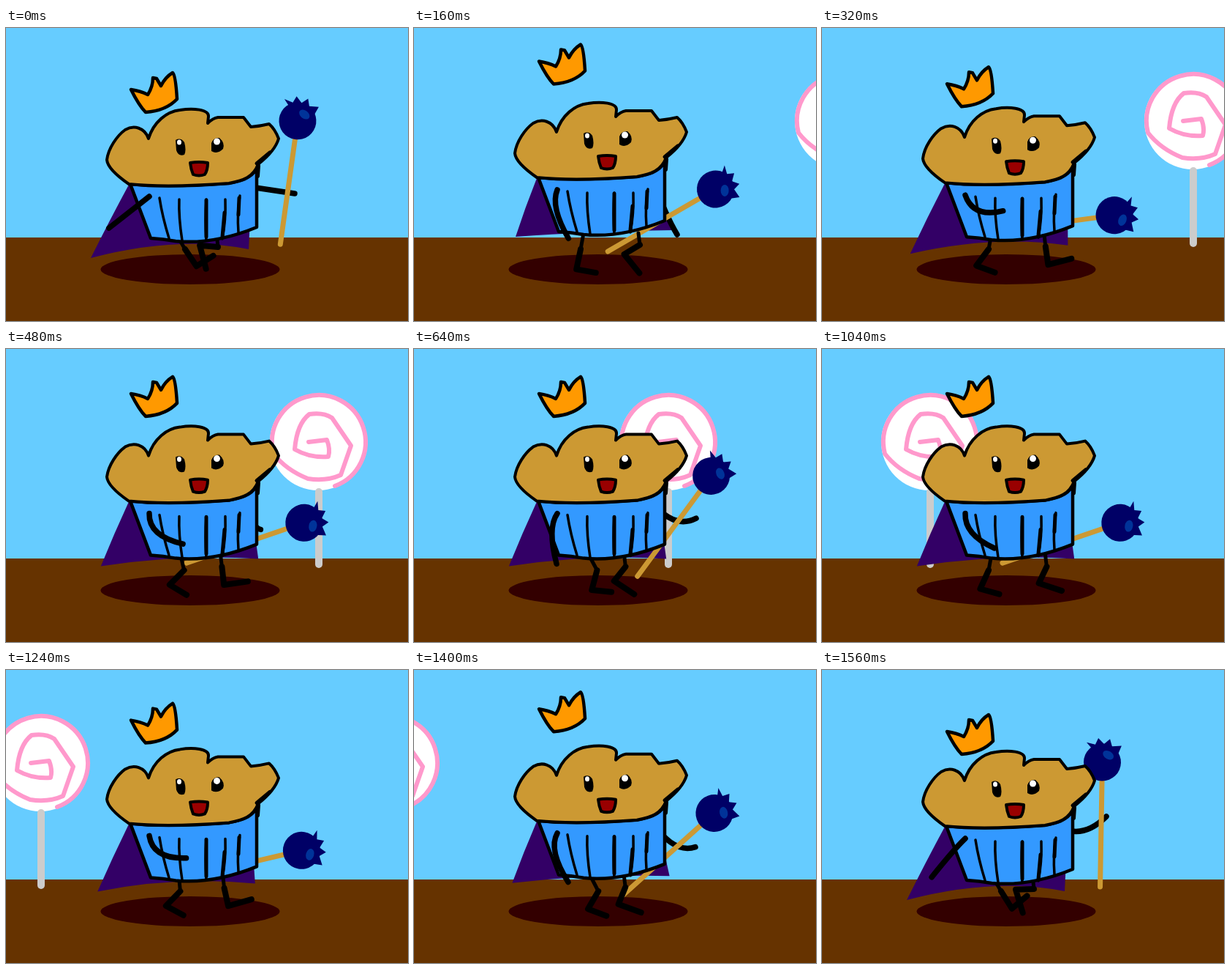
An HTML page with a canvas that plays this animation: 550 by 400 pixels, repeating every 1600 ms.

```html
<!DOCTYPE html>
<html lang="en">
<head>
<meta charset="utf-8">
<title>Marching muffin</title>
<style>
  html, body { margin: 0; width: 100%; height: 100%; overflow: hidden; }
  canvas { display: block; }
</style>
</head>
<body>
<canvas id="stage" width="550" height="400"></canvas>
<script>
const ctx = document.getElementById('stage').getContext('2d');
ctx.lineCap = ctx.lineJoin = 'round';

const STEP_MS = 40, STEPS = 40, STRIDE = 20;

const MUFFIN = new Path2D(`M168 213C155 204 139 191 138 180C140 164 152 147 163 139
  C175 132 190 136 195 151C202 128 220 114 238 112C256 109 278 111 277 121L276 130
  Q283 123 290 122H325L335 135Q348 134 360 131Q368 138 373 151Q368 168 345 186
  C338 204 325 208 305 212C265 215 215 218 168 213Z`);
const PAPER = new Path2D(`M170 213L198 287Q215 288 232 291Q284 296 343 272V192
  C335 206 320 209 305 212C265 215 215 218 170 213Z`);
const PLEATS = new Path2D('M210 232Q214 258 223 287M237 234Q236 258 241 290' +
  'M274 234Q272 262 274 290M300 234Q301 262 296 288M320 229Q316 252 318 279');
const BOLD_PLEATS = new Path2D('M274 235V285M299 252L296 285M319 232L318 255');
const EYES = new Path2D('M232 153Q239 149 244 156Q247 167 244 173Q236 176 233 167Z' +
  'M281 157Q284 149 292 150Q300 157 297 165Q289 173 281 168Z');
const MOUTH = new Path2D('M252 184Q264 182 276 184Q276 194 272 200Q264 203 256 200Q253 193 252 184Z');
const CROWN = new Path2D('M171 84Q184 86 194 91Q201 80 201 68L206 69L212 79Q218 67 228 61' +
  'Q232 64 234 97Q219 113 191 115Q182 106 171 84Z');
const LEAVES = new Path2D('M-22 -10L-15 -19L-22 -27L-10 -24L-6 -33L2 -25L10 -32L13 -22L26 -23L20 -8Z');
const SWIRL = new Path2D('M-14 0L11 -3Q16 10 13 20Q-12 22 -33 10Q-30 -25 -13 -38Q6 -41 18 -33' +
  'L44 5L30 45Q10 54 -15 50Q-45 38 -62 16A64 64 0 1 1 22 60');

const rad = degrees => degrees * Math.PI / 180;

// Point at a distance from another; angle 0 hangs down, 90 points right.
const reach = ([x, y], angle, length) =>
  [x + length * Math.sin(rad(angle)), y + length * Math.cos(rad(angle))];

// Linear swing through the five poses of a stride; the way back mirrors the way out.
function strideAt(step) {
  const leg = step < 4 ? 0 : Math.min(3, Math.floor((step + 1) / 5));
  const from = Math.max(0, leg * 5 - 1), to = leg * 5 + 4;
  const k = (step - from) / (to - from);
  return (rest, lift, far, fall = lift, settle = rest) => {
    const poses = [rest, lift, far, fall, settle];
    return poses[leg] + (poses[leg + 1] - poses[leg]) * k;
  };
}

function paint(path, fill, line, width) {
  if (fill) { ctx.fillStyle = fill; ctx.fill(path); }
  if (line) { ctx.strokeStyle = line; ctx.lineWidth = width; ctx.stroke(path); }
}

function ellipse(x, y, rx, ry, fill, tilt = 0) {
  const path = new Path2D();
  path.ellipse(x, y, rx, ry, rad(tilt), 0, 7);
  paint(path, fill);
}

function line(color, width, ...points) {
  const path = new Path2D();
  points.forEach(p => path.lineTo(...p));
  paint(path, null, color, width);
}

function curve(start, control, end) {
  const path = new Path2D();
  path.moveTo(...start);
  path.quadraticCurveTo(...control, ...end);
  paint(path, null, '#000', 7.5);
}

function shifted(x, y, drawing) {
  ctx.save();
  ctx.translate(x, y);
  drawing();
  ctx.restore();
}

function drawLollipop() {
  ellipse(-1, 0, 66, 66, '#fff');
  paint(SWIRL, null, '#ff99cc', 6);
  line('#ccc', 10, [0, 68], [0, 167]);
}

function drawCape(b) {
  const path = new Path2D();
  path.moveTo(168, 214 - 9 * b);
  path.quadraticCurveTo(142 + 10 * b, 262 - 17 * b, 116 + 23 * b, 314 - 29 * b);
  path.quadraticCurveTo(235, 283 - 5 * b, 332 + 22 * b, 302 - 26 * b);
  path.lineTo(336, 220);
  paint(path, '#330066');
}

function drawScepter(tilt) {
  ctx.rotate(rad(tilt));
  line('#cc9933', 7, [0, 84], [0, -65]);
  ctx.translate(0, -86);
  paint(LEAVES, '#000066');
  ellipse(0, 0, 25.5, 25.5, '#000066');
  ellipse(8, -10, 8, 5.5, '#003399', 30);
}

function drawLeg(hipX, knee, shinAngle, shin, footAngle, foot) {
  const ankle = reach(knee, shinAngle, shin);
  line('#000', 5, [hipX, 280], knee);
  line('#000', 8, knee, ankle, reach(ankle, footAngle, foot));
}

function drawFarArm(swing, b) {
  const shoulder = [328, 216 - 7 * b];
  const hand = [swing(395, 360, 295, 384, 389), swing(226, 282, 238, 252, 200)];
  const sag = swing(0, 10, 0, 26, 22);
  curve(shoulder, [(shoulder[0] + hand[0]) / 2, (shoulder[1] + hand[1]) / 2 + sag], hand);
}

function drawNearArm(swing, b) {
  const shoulder = [196, 230 - 9 * b];
  const elbow = reach(shoulder, swing(-52, -2, 52, 4, -43), 28);
  const hand = reach(shoulder, swing(-52, 13, 81, 26, -41), swing(70, 68, 53));
  curve(shoulder, elbow.map((e, i) => 2 * e - (shoulder[i] + hand[i]) / 2), hand);
}

function drawBody() {
  paint(PAPER, '#3399ff', '#000', 4.5);
  paint(PLEATS, null, '#000', 3.5);
  paint(BOLD_PLEATS, null, '#000', 5);
  paint(MUFFIN, '#cc9933', '#000', 4);
  line('#000', 6, [345, 188], [344, 202]);
  line('#000', 5, [343, 185], [361, 170]);
  paint(EYES, '#000');
  ellipse(237, 156, 3, 3.5, '#fff');
  ellipse(288.5, 155, 4.5, 4.5, '#fff');
  paint(MOUTH, '#990000', '#000', 4);
}

function draw(index) {
  const swing = strideAt(index % STRIDE);
  const bounce = swing(0, 1, 0);

  ctx.fillStyle = '#66ccff';
  ctx.fillRect(0, 0, 550, 286);
  ctx.fillStyle = '#663300';
  ctx.fillRect(0, 286, 550, 114);
  ellipse(252, 329.5, 122.5, 20.5, '#330000');
  shifted(668 - 20 * index, 127, drawLollipop);

  drawCape(bounce);
  drawFarArm(swing, bounce);
  shifted(swing(387, 338, 309, 338, 382), swing(212, 263, 268),
    () => drawScepter(swing(8, 60, 88, 60, 1)));
  drawLeg(swing(232, 232, 232, 243), [swing(245, 228, 228, 254), 302],
    swing(34, -12, -43, -46, 32), 28, swing(122, 80, 67, 54, 130), 27);
  const frontKnee = swing(290, 309, 305, 289);
  drawLeg(frontKnee - 2, [frontKnee, 299 - 3 * bounce],
    swing(-95, -59, 25, -6, -88), 25, swing(15, 39, 121, 83, 17), 33);

  shifted(0, -9 * bounce, drawBody);
  drawNearArm(swing, bounce);
  shifted(0, -38.5 * bounce, () => paint(CROWN, '#ff9900', '#000', 4.5));
}

function tick() {
  draw(Math.floor(performance.now() / STEP_MS) % STEPS);
  requestAnimationFrame(tick);
}
tick();
</script>
</body>
</html>
```
